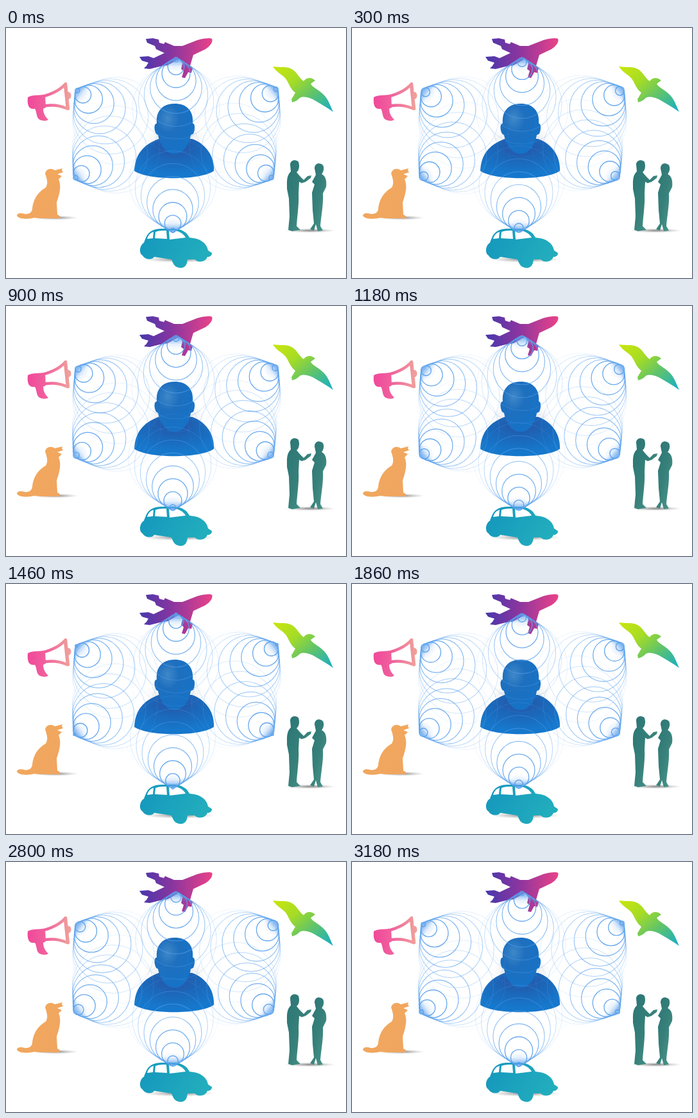
Animation of 530x390 px, one loop 3200 ms. Source, as an HTML page with a canvas:

```html
<!DOCTYPE html>
<html lang="en">
<head>
<meta charset="utf-8">
<title>Sound sources around a listener</title>
<style>
  html, body { margin: 0; width: 100%; height: 100%; overflow: hidden; background: #fff; }
  svg, canvas { position: absolute; left: 0; top: 0; width: 530px; height: 390px; }
</style>
</head>
<body>
<svg viewBox="0 0 530 390">
  <defs>
    <linearGradient id="plane"><stop stop-color="#4638ac"/><stop offset=".45" stop-color="#8a359f"/><stop offset="1" stop-color="#ea4288"/></linearGradient>
    <linearGradient id="bird" x2="1" y2=".9"><stop stop-color="#cbe60e"/><stop offset=".35" stop-color="#a5dc26"/><stop offset=".65" stop-color="#62c468"/><stop offset="1" stop-color="#1cb0c0"/></linearGradient>
    <linearGradient id="horn" gradientUnits="userSpaceOnUse" x1="34" y1="0" x2="99" y2="0"><stop stop-color="#f0489a"/><stop offset=".45" stop-color="#f0629d"/><stop offset="1" stop-color="#f0a09a"/></linearGradient>
    <linearGradient id="dog" x2="1" y2="1"><stop stop-color="#f3a95c"/><stop offset="1" stop-color="#efa560"/></linearGradient>
    <linearGradient id="car" x2="1" y2=".3"><stop stop-color="#1496bd"/><stop offset="1" stop-color="#22adbd"/></linearGradient>
    <linearGradient id="people" x2="1" y2="1"><stop stop-color="#2a7575"/><stop offset=".5" stop-color="#37807a"/><stop offset="1" stop-color="#4b9a8c"/></linearGradient>
    <radialGradient id="chest" cx=".5" cy=".2" r=".7"><stop stop-color="#2a52a4"/><stop offset=".45" stop-color="#1c66b8"/><stop offset="1" stop-color="#1678cc"/></radialGradient>
    <radialGradient id="head" cx=".33" cy=".3" r=".7"><stop stop-color="#3f88c8"/><stop offset=".4" stop-color="#1e6fbe"/><stop offset="1" stop-color="#1672c6"/></radialGradient>
    <radialGradient id="shade"><stop stop-color="#555" stop-opacity=".75"/><stop offset="1" stop-color="#999" stop-opacity="0"/></radialGradient>
  </defs>

  <g fill="url(#shade)">
    <ellipse cx="77" cy="296" rx="36" ry="3.5"/>
    <ellipse cx="474" cy="316" rx="40" ry="3.5"/>
    <ellipse cx="270" cy="361" rx="55" ry="5"/>
    <ellipse cx="264" cy="172" rx="48" ry="22" opacity=".35"/>
  </g>

  <path fill="url(#plane)" d="M321 17C319 15 307 16 298 19L275 28 262 28 248 22 246 25 239 23 238 18 229 16 218 17 220 23 232 28 234 33 247 39 230 47 222 44 208 45 212 51 222 54 219 59 215 63 224 64 240 60 252 58 270 48 275 55 273 64 277 67 274 77 279 78 284 69 289 70 291 62 287 59 292 42 311 33C319 28 323 21 321 17Z"/>

  <path fill="url(#bird)" d="M416 60C427 62 439 59 447 65C454 70 458 79 464 83C468 77 476 76 482 82L475 87C477 92 487 96 494 103C502 110 505 120 510 131C502 125 492 119 483 114C474 108 464 106 458 109C454 113 450 115 446 116L445 111 451 101C443 95 441 86 436 79C430 72 421 69 416 60Z"/>

  <g fill="url(#horn)">
    <path fill="none" stroke="url(#horn)" stroke-width="4.5" stroke-linejoin="round" d="M56 107C72 103 84 97 92 88L96 126C83 120 70 119 56 122"/>
    <path d="M34 108C41 104 52 105 61 104L62 124 58 126C58 134 62 139 66 143C62 146 55 145 51 142C47 138 48 130 45 126C34 128 33 117 34 108Z"/>
    <path fill="none" stroke="url(#horn)" stroke-width="4.5" stroke-linecap="round" d="M93 87L97 126M97 102C100 103 100 108 97 109"/>
  </g>

  <path fill="url(#dog)" d="M88 219L76 222C69 217 62 221 61 227C64 236 66 242 62 249C50 256 43 266 41 281C41 288 35 291 29 290C23 288 17 289 17 293C20 298 32 299 44 296L54 297 65 297 84 297C86 293 81 292 80 291L79 272C83 260 87 247 82 236L87 231 80 228 89 225 87 222Z"/>

  <g fill="url(#car)">
    <path d="M216 332L219 325C223 317 231 313 243 313L263 313C275 314 282 319 286 327C302 328 313 335 315 347L321 351C321 355 318 357 314 357C311 365 300 367 294 361L283 361C282 372 277 375 270 374C262 373 260 366 258 361L231 357C227 363 216 361 213 355C206 351 209 338 215 335Z"/>
    <path fill="#fff" d="M220 329C222 322 226 319 230 318L229 328ZM232 328L233 318C239 316 245 316 250 316L251 329ZM254 316C268 315 276 320 280 327L255 330Z"/>
  </g>

  <g fill="url(#people)">
    <path d="M443 213C443 206 452 204 456 209C458 215 457 222 453 225L458 231 464 237 470 231 476 230 475 234 467 240 461 242 457 240 456 258C457 274 454 293 453 309L459 315 446 317 440 315 442 294 441 266 438 251C438 240 437 230 444 224Z"/>
    <path d="M481 219C481 211 489 209 494 214C497 219 494 226 492 228C499 231 500 240 499 248L494 258C495 276 491 294 490 309L494 316 486 317 483 306 480 316 474 314 480 305 478 284 477 257 481 244 477 240 483 229Z"/>
  </g>

  <path fill="url(#chest)" d="M200 223C201 197 214 182 238 173L290 173C312 181 325 200 324 223C302 238 222 238 200 223Z"/>
  <path fill="url(#head)" d="M235 149C233 130 244 118 263 118C282 118 293 130 291 149C295 149 295 158 292 165L288 167C286 180 279 190 272 194C266 197 259 197 253 194C245 189 239 178 237 167L234 165C230 157 231 149 235 149Z"/>
</svg>
<canvas id="waves"></canvas>

<script>
const LOOP = 3200, PERIOD = 800, LIFE = 8.6, STEP = 9.2, START = -305, SPREAD = 0.84;
// x, y, direction in degrees
const sources = [
  [265, 45, 90], [108, 95, 38], [424, 93, 142],
  [105, 236, -35], [417, 236, -141], [260, 320, -90]
];
const canvas = document.getElementById('waves');
const ctx = canvas.getContext('2d');
const ratio = window.devicePixelRatio || 1;
canvas.width = 530 * ratio;
canvas.height = 390 * ratio;
ctx.scale(ratio, ratio);

function glow(x, y, angle) {
  const g = ctx.createRadialGradient(x, y, 0, x, y, 24);
  g.addColorStop(0, 'rgba(105,165,240,.45)');
  g.addColorStop(1, 'rgba(105,165,240,0)');
  ctx.fillStyle = g;
  ctx.beginPath();
  ctx.moveTo(x, y);
  ctx.arc(x, y, 24, angle - 1, angle + 1);
  ctx.fill();
}

function ring(x, y, angle, age) {
  const r = STEP * age, d = r / SPREAD;
  const fade = 1 - age / LIFE;
  ctx.strokeStyle = `rgba(88,160,236,${Math.min(0.9, 1.25 * fade)})`;
  ctx.lineWidth = 0.8 + 0.7 * fade;
  ctx.beginPath();
  ctx.arc(x + d * Math.cos(angle), y + d * Math.sin(angle), r, 0, 2 * Math.PI);
  ctx.stroke();
}

function draw(now) {
  const phase = ((now % LOOP - START) / PERIOD) % 1;
  ctx.clearRect(0, 0, 530, 390);
  for (const [x, y, deg] of sources) {
    const angle = deg * Math.PI / 180;
    glow(x, y, angle);
    for (let age = phase; age < LIFE; age++) ring(x, y, angle, age);
  }
  requestAnimationFrame(draw);
}
draw(0);
</script>
</body>
</html>
```
